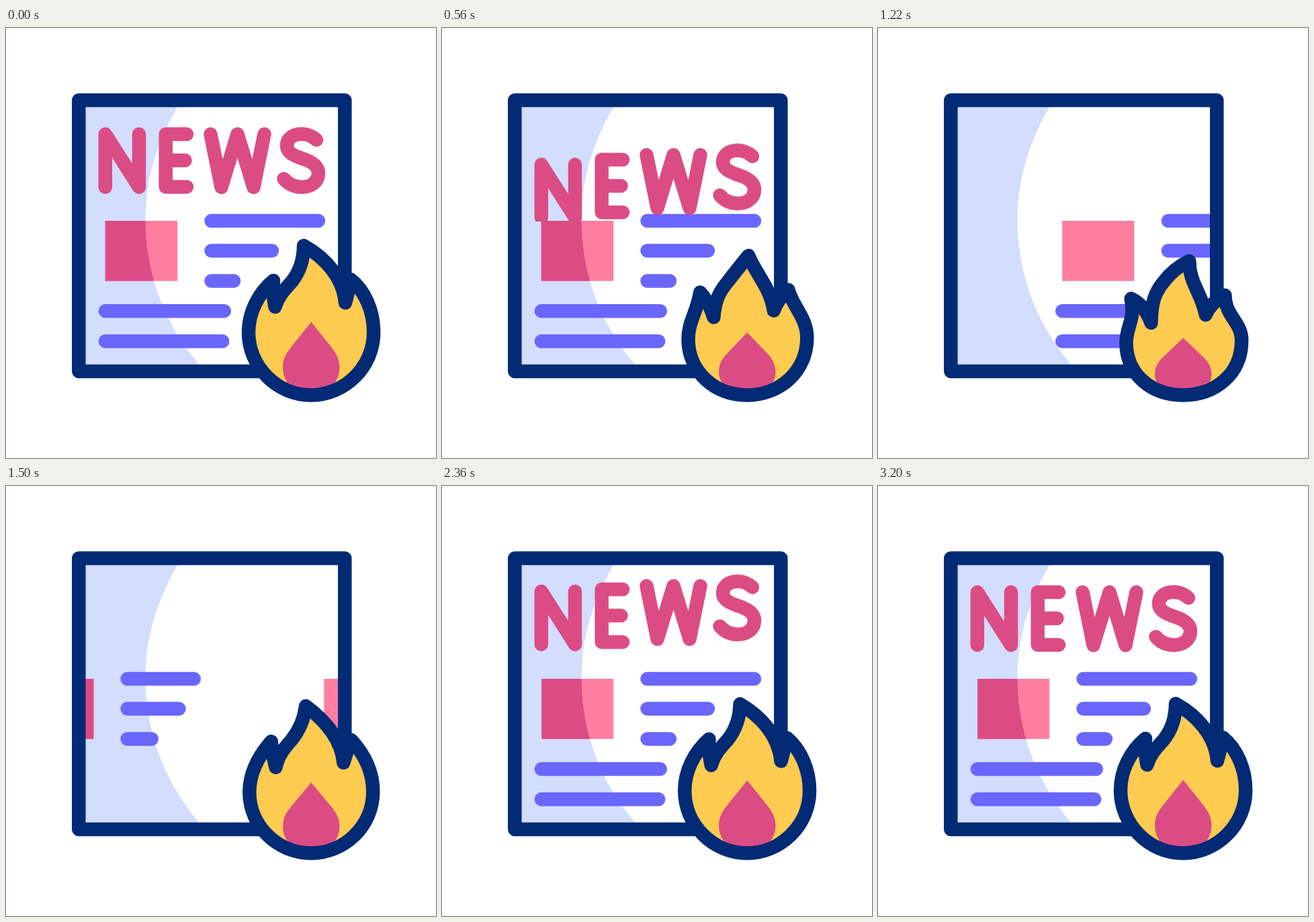
An HTML page for the animation above (3.22 s loop, 640 by 640 pixels).

```html
<!DOCTYPE html>
<html lang="en">
<head>
<meta charset="utf-8">
<title>Hot news</title>
<style>
  html, body { margin: 0; width: 100%; height: 100%; overflow: hidden; background: #fff; }
  svg { display: block; width: 100%; height: 100%; }

  .line, .outline, .letter { fill: none; stroke-width: 20.5; stroke-linecap: round; stroke-linejoin: round; }
  .line { stroke: #6a66fc; }
  .outline { stroke: #032a75; }
  .letter { stroke: #db4c85; }
  .light { fill: #ff7e9f; }
  .dark { fill: #db4c85; }
  .yellow { fill: #fdcb50; }

  /* the easing applies between each pair of keyframes */
  .flame, .drop, .slide, .grow, .letter {
    animation: 3220ms cubic-bezier(.333, 0, .667, 1) infinite both;
  }

  /* flame: four 800 ms flickers */
  .flame { animation-name: flame; }
  .drop { animation-name: drop; }
  @keyframes flame {
    0%, 24.845%, 49.689%, 74.534%, 99.379%, 100% {
      d: path("M398 376C396 390 398 402 400.5 415C405 399 415 389 425 378C437 363 443 346 443 324C474 341 502 371 505 409C508 398 511 385 513.5 374.5C534 391 547.2 421 547.2 453C547.2 504 505 546.4 454 546.4C403 546.4 361 504 361 453C361 424 375 395 398 376Z");
    }
    12.422%, 37.267%, 62.112%, 86.957% {
      d: path("M376.5 403C392 410 401 424 406.5 439C407 410 411 395 425 378C435 365 448 354 463.5 347C463 380 482 395 487.5 427C494 412 504 404 516.5 398C516.5 430 541.2 437 541.2 465C541 516 501 546.4 454 546.4C407 546.4 370 516 369.5 469C369.5 443 383 437 376.5 403Z");
    }
  }
  @keyframes drop {
    0%, 24.845%, 49.689%, 74.534%, 99.379%, 100% {
      d: path("M454.2 437.5L485 476C492 485 496.5 494 496.5 505C496.5 528 477 547 454.2 547C431 547 412 528 412 505C412 494 416 485 423.5 476Z");
    }
    12.422%, 37.267%, 62.112%, 86.957% {
      d: path("M454.2 461.5L486 491.5C492 498 496.5 505 496.5 516C496.5 533 477 547 454.2 547C431 547 412 533 412 516C412 505 416 498 422.5 491.5Z");
    }
  }

  /* picture and lines leave to the right while a second set follows */
  .slide { animation-name: slide; }
  @keyframes slide {
    0%, 27.95% { transform: translateX(0); }
    56.522%, 100% { transform: translateX(450.5px); }
  }
  .grow { animation-name: grow; animation-delay: var(--at); }
  @keyframes grow {
    0% { stroke-dasharray: 0 400; }
    12.422% { stroke-dasharray: 115 400; }
    21.739%, 66% { stroke-dasharray: 100 400; }
    66.01%, 100% { stroke-dasharray: 0 400; }
  }

  /* letters drop out below, then come back from above */
  .letter {
    animation-name: fall, rise;
    animation-delay: calc(var(--i) * 20ms), calc(var(--i) * 40ms);
  }
  @keyframes fall {
    0%, 11.18% { translate: 0 0; }
    28.571%, 40% { translate: 0 154px; }
    40.01%, 100% { translate: 0 0; }
  }
  @keyframes rise {
    0%, 32% { transform: translateY(0); }
    32.01%, 45% { transform: translateY(-400px); }
    45.01%, 49.689% { transform: translateY(-154px); }
    74.534%, 100% { transform: translateY(0); }
  }
</style>
</head>
<body>
<svg viewBox="0 0 640 640">
  <defs>
    <path id="shade" d="M108 108H261C226 164 207.5 224 207.5 285C207.5 367 237 442 287.5 501L296 511H108Z"/>
    <clipPath id="inShade"><use href="#shade"/></clipPath>
    <clipPath id="page"><rect x="108" y="108" width="396" height="403"/></clipPath>
    <clipPath id="headline"><rect x="108" y="108" width="396" height="180"/></clipPath>
    <g id="picture"><path d="M147.7 287h107.5v89.6h-107.5z"/><path d="M-302.8 287h107.5v89.6h-107.5z"/></g>
  </defs>

  <use href="#shade" fill="#d3ddfe"/>

  <g clip-path="url(#page)">
    <g class="slide light"><use href="#picture"/></g>
    <g clip-path="url(#inShade)">
      <g class="slide dark"><use href="#picture"/></g>
    </g>
    <g class="slide">
      <path class="line" d="M305.5 287h159.5M305.5 331.6h90.5M305.5 376.5h33.5M147.8 421.3h177M147.8 466.2h174.5"/>
      <g transform="translate(-450.5)">
        <path class="line grow" style="--at:1290ms" pathLength="120" d="M305.5 287h191.4"/>
        <path class="line grow" style="--at:1235ms" pathLength="120" d="M305.5 331.6h108.6"/>
        <path class="line grow" style="--at:1160ms" pathLength="120" d="M305.5 376.5h40.2"/>
        <path class="line grow" style="--at:1600ms" pathLength="120" d="M147.8 421.3h212.4"/>
        <path class="line grow" style="--at:1640ms" pathLength="120" d="M147.8 466.2h209.4"/>
      </g>
    </g>
  </g>

  <g clip-path="url(#headline)" role="img" aria-label="NEWS">
    <path class="letter" style="--i:0" d="M147.8 236.7V158L198 236.7V158"/>
    <path class="letter" style="--i:1" d="M269 158H237.7V236.5H269M237.7 197H266.5"/>
    <path class="letter" style="--i:2" d="M304.5 158L320.5 237L344.5 158L368.5 237L384.5 158"/>
    <path class="letter" style="--i:3" d="M462 166.5C455 160 447 157.7 440 157.7C427 157.7 418 165 418 175C418 186 429 190 440 194C453 198 465 204 465 216C465 229 454 236.7 440 236.7C429 236.7 420 232 413.5 224.5"/>
  </g>

  <rect class="outline" x="108.3" y="107.5" width="396" height="403.5"/>

  <path class="flame yellow"/>
  <path class="drop dark"/>
  <path class="flame outline"/>
</svg>
</body>
</html>
```
